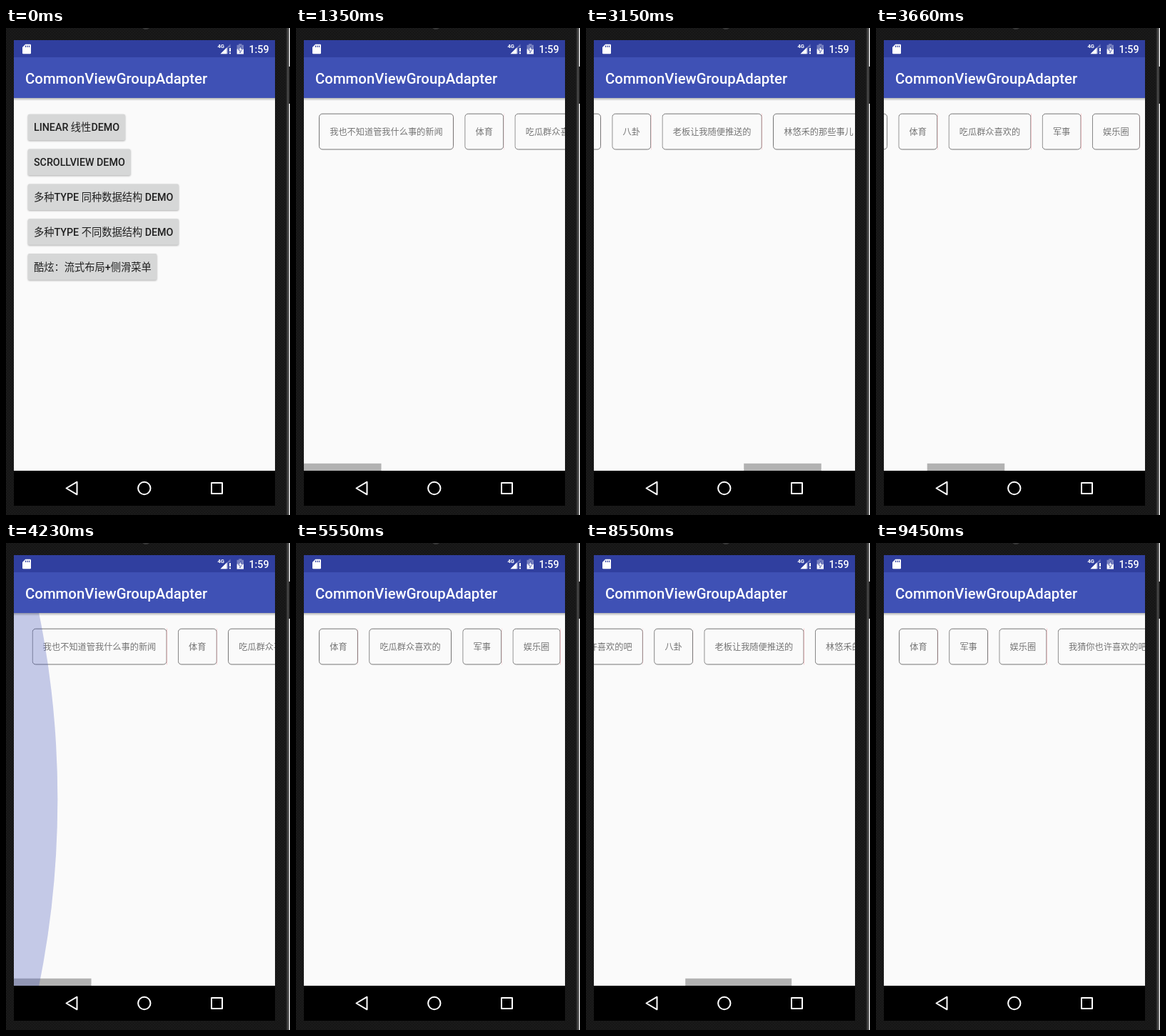
An HTML page that plays this animation: 398x682 px, repeating every 9.78 s.

```html
<!DOCTYPE html>
<html lang="zh">
<head>
<meta charset="utf-8">
<title>CommonViewGroupAdapter</title>
<style>
html, body { margin: 0; width: 100%; height: 100%; overflow: hidden; background: #fff; }
svg { display: block; }
#stage { position: absolute; left: 0; top: 0; }
text { font-family: Roboto, "Noto Sans CJK SC", "Noto Sans CJK", sans-serif; white-space: pre; }
.title { font-size: 20.36px; font-weight: 500; fill: #fff; }
.label { font-size: 14.25px; font-weight: 500; fill: #202020; }
.label tspan { font-weight: 400; }
.btn { fill: #d6d7d7; filter: drop-shadow(0 1px 1px rgba(0,0,0,.3)); }
.btn.down { filter: drop-shadow(0 2px 1.5px rgba(0,0,0,.4)); }
.chip { fill: none; stroke: #757575; }
.word { font-size: 12.19px; fill: #757575; }
.del { font-size: 14.25px; fill: #fff; text-anchor: middle; }
</style>
</head>
<body>
<svg id="stage" width="398" height="682" viewBox="0 0 398 682">
  <defs>
    <clipPath id="screen"><rect x="11" y="17" width="366" height="652"/></clipPath>
    <clipPath id="view"><rect x="11" y="98" width="366" height="522"/></clipPath>
    <linearGradient id="shade" x2="0" y2="1">
      <stop stop-color="#000" stop-opacity=".28"/><stop offset="1" stop-color="#000" stop-opacity="0"/>
    </linearGradient>
    <linearGradient id="side">
      <stop stop-color="#171717"/><stop offset=".5" stop-color="#3c3c3c"/><stop offset="1" stop-color="#777"/>
    </linearGradient>
    <pattern id="grain" width="4" height="4" patternUnits="userSpaceOnUse">
      <rect width="4" height="4" fill="#171717"/>
      <path d="M0 .5h1M2 2.5h1" stroke="#202020"/>
    </pattern>
    <g id="bars">
      <rect x="11" y="98" width="366" height="4" fill="url(#shade)"/>
      <rect x="11" y="17" width="366" height="24.4" fill="#303f9f"/>
      <rect x="11" y="41" width="366" height="57" fill="#3f51b5"/>
      <text class="title" x="27" y="77.5">CommonViewGroupAdapter</text>
    </g>
  </defs>

  <rect width="393" height="682" fill="url(#grain)"/>
  <rect x="392" width="5" height="682" fill="url(#side)"/>
  <rect x="396" y="54" width="2" height="52" fill="#222"/>
  <ellipse cx="196" cy="-1" rx="5" ry="3" fill="#3a3a3a"/>
  <rect x="11" y="17" width="366" height="652"/>

  <g clip-path="url(#screen)">
    <g id="menu">
      <rect x="11" y="98" width="366" height="522" fill="#fafafa"/>
      <use href="#bars"/>
    </g>
    <g id="page">
      <rect x="11" y="98" width="366" height="522" fill="#fafafa"/>
      <rect x="11" y="620" width="366" height="60"/>
      <g clip-path="url(#view)">
        <g id="chips"></g>
        <rect id="thumb" y="609.8" height="10.2" fill="#b2b2b2"/>
        <ellipse id="glow" cy="359" ry="783" fill="#3f51b5"/>
      </g>
      <use href="#bars"/>
    </g>
  </g>

  <g fill="#fff">
    <path d="M27.2 22.8h6.6a1.2 1.2 0 0 1 1.2 1.2v11a1.2 1.2 0 0 1-1.2 1.2h-9.6a1.2 1.2 0 0 1-1.2-1.2v-8z"/>
    <path d="M27.5 24.5v2.5M30 24.5v2.5M32.5 24.5v2.5" stroke="#303f9f" stroke-width="1.2"/>
    <text x="296.5" y="28.2" font-size="7.6" font-weight="700" textLength="">4G</text>
    <path d="M300.5 36.3L314.5 22.5V27H311.5V36.3z" opacity=".3"/>
    <path d="M300.5 36.3L309.5 27.3V36.3z"/>
    <path d="M313 28h2v5h-2zM313 34.3h2v2h-2z"/>
    <path d="M323.6 23.8h2.6v-1.5h4.2v1.5h2.6v6h-9.4z" opacity=".35"/>
    <path d="M323.6 29.5h9.4v7h-9.4z"/>
    <path d="M329.4 25l-3.8 6h2.3v4l3.7-6h-2.2z" stroke="#303f9f" stroke-width=".7"/>
    <text x="368.5" y="34.6" font-size="14.25" font-weight="500" text-anchor="end">1:59</text>
  </g>
  <g fill="none" stroke="#fff" stroke-width="2" stroke-linejoin="round">
    <path d="M84.5 644.5L99.5 635.7V653.3z"/>
    <circle cx="193.8" cy="644.5" r="8.7"/>
    <rect x="288" y="637" width="15" height="15"/>
  </g>
</svg>
<script>
const LOOP = 9780, LEFT = 11, VIEW = 366;
const GLYPH = 12.19, PAD = 15.25, GAP = 15.3, MENU = 61;
const $ = id => document.getElementById(id);

function add(parent, tag, attrs, text) {
  const el = document.createElementNS('http://www.w3.org/2000/svg', tag);
  set(el, attrs);
  if (text) el.textContent = text;
  return parent.appendChild(el);
}
function set(el, attrs) {
  for (const k in attrs) el.setAttribute(k, attrs[k]);
}

// Menu buttons: label and right edge
const buttons = [
  ['LINEAR 线性DEMO', 167], ['SCROLLVIEW DEMO', 174.5],
  ['多种TYPE 同种数据结构 DEMO', 242], ['多种TYPE 不同数据结构 DEMO', 242],
  ['酷炫：流式布局+侧滑菜单', 211.3]
].map(([label, right], i) => {
  const y = 120.7 + i * 48.85;
  const box = add($('menu'), 'rect', { class: 'btn', x: 30.8, y, width: right - 30.8, height: 36.6, rx: 2 });
  const text = add($('menu'), 'text', { class: 'label', x: 39, y: y + 23.6 });
  for (const part of label.match(/[\x00-\x7f]+|[^\x00-\x7f]+/g)) {
    if (part.charCodeAt(0) < 128) text.append(part);
    else add(text, 'tspan', {}, part);
  }
  return box;
});

const chips = [
  '我也不知道管我什么事的新闻', '体育', '吃瓜群众喜欢的', '军事', '娱乐圈',
  '我猜你也许喜欢的吧', '八卦', '老板让我随便推送的', '林悠禾的那些事儿', '程序员的小日常'
].map(word => {
  const w = word.length * GLYPH + 2 * PAD;
  const box = add($('chips'), 'svg', { y: 119, width: w, height: 52 });
  const body = add(box, 'g', {});
  add(body, 'rect', { class: 'chip', x: .5, y: 1.2, width: w - 1, height: 49.8, rx: 4.5 });
  add(body, 'text', { class: 'word', x: PAD, y: 30.8 }, word);
  add(body, 'rect', { x: w, y: .7, width: MENU, height: 50.8, fill: '#ff4a57' });
  add(body, 'text', { class: 'del', x: w + MENU / 2, y: 31.3 }, '删除');
  return { box, body, w };
});

// Steps are [time, value, power]; a negative power eases out
const scrollSteps = [
  [2055, 0], [2430, 869, 1.4], [3045, 869], [3150, 711, 1.2], [3765, 190, -2],
  [3915, 190], [4140, 0, 1.3], [7725, 0], [8010, 534, 1.4], [8425, 534],
  [8550, 317, 1.2], [8715, 0]
];
const barSteps = [[4730, 1], [4970, 0], [7725, 0], [7726, 1], [9200, 1], [9450, 0]];
const swipes = { 0: [[5005, 0], [5310, MENU, -2]], 2: [[6435, 0], [6870, MENU, -2]] };
const removed = { 0: 5550, 2: 7110 };
const hits = [[2430, 1], [4140, -1], [8010, 1], [8715, -1]];

function tween(steps, t) {
  const i = steps.findIndex(s => s[0] > t);
  if (i < 0) return steps[steps.length - 1][1];
  if (i === 0) return steps[0][1];
  const [t0, a] = steps[i - 1], [t1, b, pow = 1] = steps[i];
  const p = (t - t0) / (t1 - t0);
  return a + (b - a) * (pow < 0 ? 1 - (1 - p) ** -pow : p ** pow);
}

function drawGlow(t, hit) {
  const age = hit ? t - hit[0] : Infinity;
  if (age >= 540) return set($('glow'), { opacity: 0 });
  const fade = age < 120 ? 1 : ((540 - age) / 420) ** 2;
  const scale = .62 * (age < 120 ? 1 - (1 - age / 120) ** 2 : fade);
  const edge = hit[1] < 0 ? LEFT : LEFT + VIEW;
  set($('glow'), { cx: edge + hit[1] * 678 * scale, rx: 783 * scale, opacity: .29 * fade });
}

function draw(t) {
  buttons[4].classList.toggle('down', t >= 840);

  // Page opens by fading in and rising
  const open = Math.min(1, Math.max(0, (t - 1000) / 350));
  const alpha = Math.min(1, Math.max(0, (t - 1000) / 200));
  set($('page'), {
    transform: `translate(0 ${52 * (1 - open) ** 5})`,
    opacity: 1 - (1 - alpha) ** 4
  });

  const hit = hits.filter(h => h[0] <= t).pop();
  const age = hit ? t - hit[0] : 180;
  const bounce = age < 180 ? hit[1] * 4.6 * Math.sin(Math.PI * age / 180) : 0;
  const scroll = tween(scrollSteps, t);

  let x = 32;
  chips.forEach(({ box, body, w }, i) => {
    const gone = t >= removed[i];
    box.style.display = gone ? 'none' : '';
    if (gone) return;
    set(box, { x: x - scroll - bounce });
    if (swipes[i]) set(body, { transform: `translate(${-tween(swipes[i], t)} 0)` });
    x += w + GAP;
  });

  const content = x - LEFT;
  set($('thumb'), {
    x: LEFT + scroll / content * VIEW,
    width: VIEW * VIEW / content,
    opacity: tween(barSteps, t)
  });
  drawGlow(t, hit);
}

const start = performance.now();
function tick() {
  draw((performance.now() - start) % LOOP);
  requestAnimationFrame(tick);
}
tick();
</script>
</body>
</html>
```
